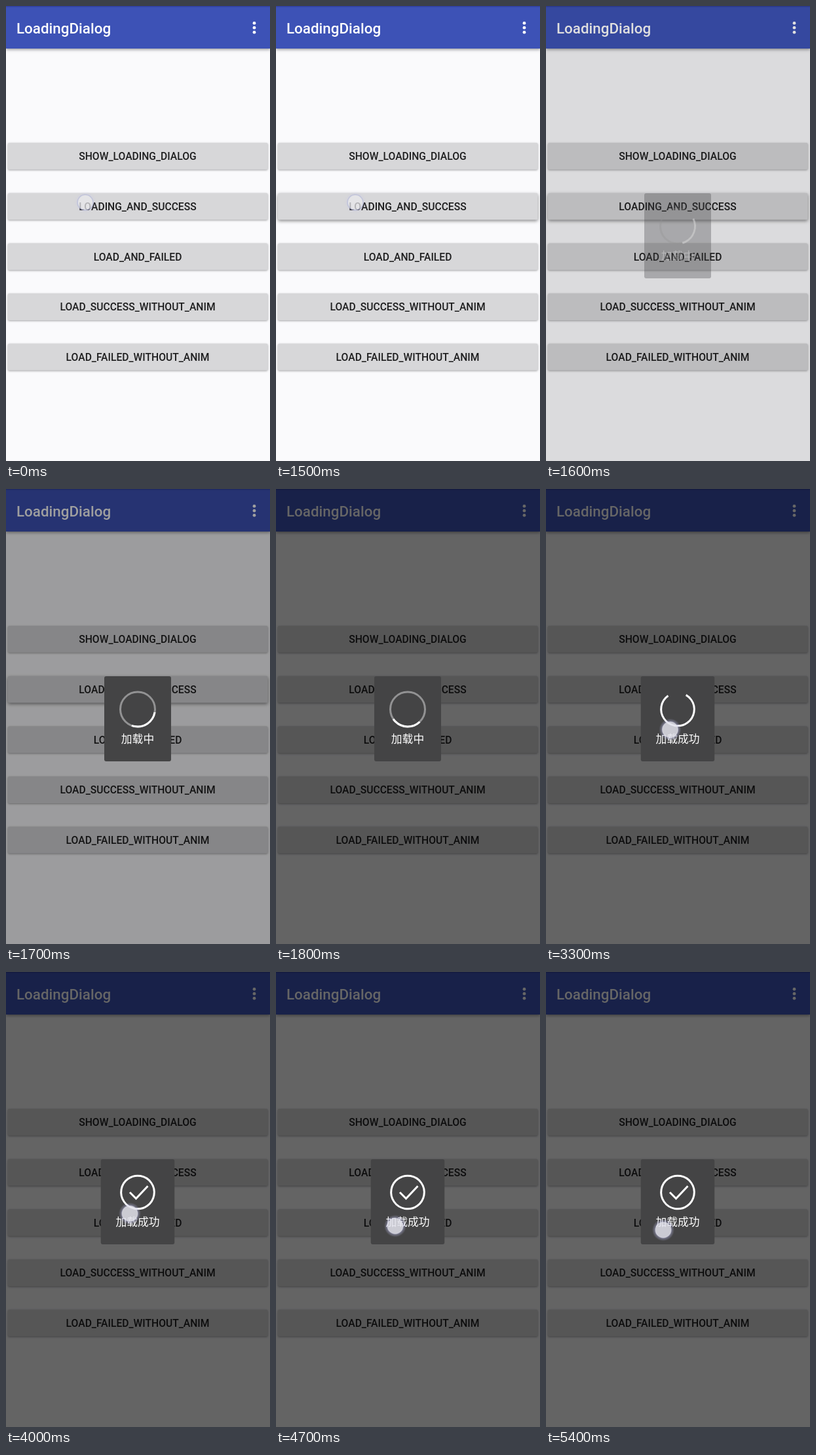
An HTML page with a canvas that plays this animation: 403x695 px, repeating every 5.5 s.

```html
<!DOCTYPE html>
<html lang="zh-CN">
<head>
<meta charset="utf-8">
<title>LoadingDialog</title>
<style>
html, body { margin: 0; width: 100%; height: 100%; overflow: hidden; background: #fafafc; }
canvas { display: block; }
</style>
</head>
<body>
<canvas width="403" height="695"></canvas>
<script>
const c = document.querySelector('canvas').getContext('2d');
const W = 403, H = 695, LOOP = 5500, STEP = 100;
const LABELS = ['SHOW_LOADING_DIALOG', 'LOADING_AND_SUCCESS', 'LOAD_AND_FAILED',
  'LOAD_SUCCESS_WITHOUT_ANIM', 'LOAD_FAILED_WITHOUT_ANIM'];
const ROBOTO = 'Roboto, sans-serif';
const CJK = '"Noto Sans CJK SC", "Noto Sans CJK", "Noto Sans CJK JP", sans-serif';
// touch path: time, x, y
const TOUCH = [[2500, 190, 366], [4000, 189, 369], [4400, 183, 385], [5000, 181, 391], [5400, 179, 394]];

const ramp = (t, a, b) => Math.min(1, Math.max(0, (t - a) / (b - a)));
const rad = deg => deg * Math.PI / 180;

function text(s, x, y, font, color, align = 'center') {
  c.font = font;
  c.fillStyle = color;
  c.textAlign = align;
  c.fillText(s, x, y);
}

function box(x, y, w, h, r, color) {
  c.fillStyle = color;
  c.beginPath();
  c.roundRect(x, y, w, h, r);
  c.fill();
}

function disc(x, y, r, color) {
  c.fillStyle = color;
  c.beginPath();
  c.arc(x, y, r, 0, 7);
  c.fill();
}

function arc(x, y, r, from, sweep, color) {
  c.strokeStyle = color;
  c.lineWidth = 3;
  c.beginPath();
  c.arc(x, y, r, rad(from), rad(from + sweep), sweep < 0);
  c.stroke();
}

function shadow(blur, dy, alpha) {
  c.shadowColor = `rgba(0,0,0,${alpha})`;
  c.shadowBlur = blur;
  c.shadowOffsetY = dy;
}

function screen(t) {
  c.fillStyle = '#fafafc';
  c.fillRect(0, 0, W, H);
  c.save();
  shadow(4, 1.5, 0.35);
  c.fillStyle = '#3d52b6';
  c.fillRect(0, 0, W, 65);
  c.restore();
  c.fillStyle = '#3040a0';
  c.fillRect(0, 0, W, 1.5);
  text('LoadingDialog', 16, 42, '500 22.39px ' + ROBOTO, '#fff', 'left');
  for (const y of [26.2, 33.2, 40.2]) disc(379, y, 2.4, '#fff');
  LABELS.forEach((s, i) => {
    const y = 209 + i * 76.7, raised = i === 1 && t >= 1500 && t < 1800;
    c.save();
    shadow(raised ? 5 : 3, raised ? 2 : 1, raised ? 0.45 : 0.35);
    box(3, y, 396.5, 40.8, 2, '#d7d7d9');
    c.restore();
    text(s, 201, y + 26.3, '500 15.67px ' + ROBOTO, '#1d1d1e');
  });
}

function tick(x, y, length) {
  const a = Math.min(length, 10), b = Math.max(0, length - 10);
  c.strokeStyle = '#fff';
  c.lineWidth = 3;
  c.beginPath();
  c.moveTo(x - 12, y);
  c.lineTo(x - 12 + a * 0.95, y + a * 0.95);
  if (b) c.lineTo(x - 2.5 + b, y + 9.5 - b * 1.06);
  c.stroke();
}

function dialog(t) {
  const done = t >= 2500;
  const x = done ? (t < 2700 ? 202.5 : 201) : 201, y = 336.5;
  const w = done ? 112.5 : 102;
  c.globalAlpha = ramp(t, 1550, 1700);
  box(x - w / 2, 286, w, 130, 3, '#444445');
  if (done) {
    arc(x, y, 25.3, 235, -360 * ramp(t, 2457, 3486), '#fff');
    if (t > 3486) tick(x, y, 28 * ramp(t, 3486, 3950));
  } else {
    arc(x, y, 26.5, 0, 360, '#929293');
    arc(x, y, 26.5, 10 + (t - 1700) * 0.36, 100, '#fff');
  }
  text(done ? '加载成功' : '加载中', x, 388.2, '16.8px ' + CJK, '#fff');
  c.globalAlpha = 1;
}

function touch(x, y, glow) {
  const g = c.createRadialGradient(x, y, 11, x, y, 17);
  g.addColorStop(0, `rgba(190,190,235,${glow})`);
  g.addColorStop(1, 'rgba(190,190,235,0)');
  disc(x, y, 17, g);
  disc(x, y, 11.8, 'rgba(236,236,236,0.68)');
  c.strokeStyle = glow > 0.4 ? 'rgba(225,225,235,0.5)' : 'rgba(175,180,215,0.6)';
  c.lineWidth = 1.5;
  c.beginPath();
  c.arc(x, y, 11.8, 0, 7);
  c.stroke();
}

function touchAt(t) {
  const i = Math.max(1, TOUCH.findIndex(k => k[0] >= t));
  const [t0, x0, y0] = TOUCH[i - 1], [t1, x1, y1] = TOUCH[i];
  const p = ramp(t, t0, t1);
  return [x0 + (x1 - x0) * p, y0 + (y1 - y0) * p];
}

function draw(now) {
  const t = Math.floor(now % LOOP / STEP) * STEP;
  screen(t);
  if (t < 1600) {
    touch(121, 300, 0.2);
  } else {
    c.fillStyle = `rgba(0,0,0,${0.6 * ramp(t, 1550, 1790)})`;
    c.fillRect(0, 0, W, H);
    dialog(t);
    if (t >= 2500) touch(...touchAt(t), 0.55);
  }
}

const start = performance.now();
function loop() {
  draw(performance.now() - start);
  requestAnimationFrame(loop);
}
loop();
</script>
</body>
</html>
```
